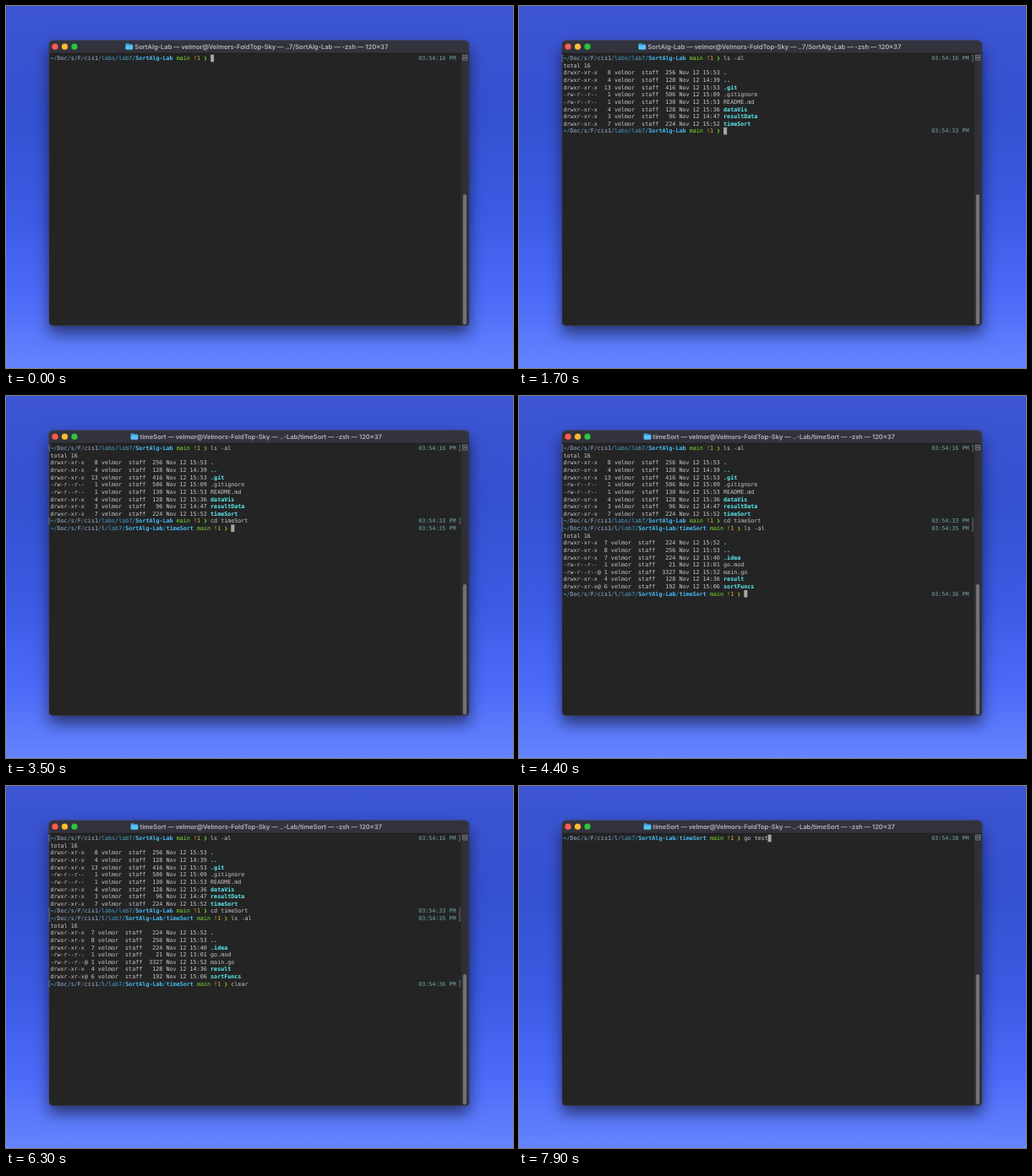
Animation of 600 by 429 pixels, one loop 8000 ms. Source, as an HTML page:

```html
<!DOCTYPE html>
<html lang="en">
<head>
<meta charset="utf-8">
<title>Terminal session</title>
<style>
  html, body { margin: 0; width: 100%; height: 100%; overflow: hidden; }
  body { background: linear-gradient(#3d55d2 0%, #3451d0 30%, #3c5be4 58%, #4b6af8 80%, #6584fe 100%); }
  svg { position: absolute; left: 0; top: 0; }
  .window {
    position: absolute; left: 50.5px; top: 40.5px; width: 497px; height: 338.5px;
    border-radius: 5.5px; background: #242424;
    box-shadow: 0 0 1px rgba(0,0,0,.8), 0 9px 18px rgba(0,0,0,.55);
  }
  text { white-space: pre; text-rendering: geometricPrecision; }
  .title { font: 600 7.5px Inter, sans-serif; fill: #b6b7be; }
  #screen text { font: 6.7px "DejaVu Sans Mono", monospace; fill: #c9c9c9; }
  #screen .dir { fill: #45a3cf; }
  #screen .short { fill: #a9b4d2; }
  #screen .anchor { fill: #46bdf8; font-weight: bold; }
  #screen .git { fill: #7fe02e; }
  #screen .dirty { fill: #e0b630; }
  #screen .clock { fill: #72a8ab; }
  #screen .folder { fill: #5ceef2; font-weight: bold; }
  .mark { fill: none; stroke: #8c8c8c; stroke-width: .7; }
</style>
</head>
<body>
<div class="window"></div>
<svg id="stage" width="600" height="429" viewBox="0 0 600 429">
  <path d="M50.5 56V46a5.5 5.5 0 0 1 5.5-5.5H542a5.5 5.5 0 0 1 5.5 5.5V56z" fill="#32333c"/>
  <path d="M50.5 56.2H547.5" stroke="#18181b" stroke-width=".6"/>
  <path d="M538.5 56.5H547.5V373.500a5.500 5.500 0 0 1-5.500 5.500H538.500z" fill="#2e2f37"/>
  <rect x="50.800" y="40.800" width="496.400" height="337.900" rx="5.300" fill="none" stroke="#5d5e68" stroke-opacity=".6" stroke-width=".6"/>
  <circle cx="58" cy="48.200" r="3.600" fill="#fd5b53"/>
  <circle cx="69.500" cy="48.200" r="3.600" fill="#fdbc2f"/>
  <circle cx="81" cy="48.200" r="3.600" fill="#2ac63f"/>
  <rect x="540.800" y="223" width="4.200" height="154.500" rx="2.100" fill="#71727a"/>
  <g fill="none" stroke="#94959b" stroke-width=".7">
    <rect x="540.700" y="58.200" width="4.800" height="5.800"/>
    <path d="M541.500 60.400h3.200M541.500 61.800h3.200"/>
  </g>
  <g id="titles"></g>
  <g id="screen"></g>
</svg>
<script>
const LOOP = 8000, CELL = 4.034, LINE = 8.62, LEFT = 52.5, TOP = 57.6;
const USER = "velmor", HOST = "Velmors-FoldTop-Sky";
const CLEARED = 6400, MOVED = 3300;
const screen = document.getElementById("screen");
const titles = document.getElementById("titles");

function add(parent, tag, attrs, content = "") {
  const el = document.createElementNS("http://www.w3.org/2000/svg", tag);
  for (const key in attrs) el.setAttribute(key, attrs[key]);
  el.textContent = content;
  parent.append(el);
  return el;
}
const colX = col => LEFT + col * CELL;
const rowY = row => TOP + row * LINE;
const show = (el, on) => el.setAttribute("visibility", on ? "visible" : "hidden");

function write(parent, row, col, content, cls = "") {
  add(parent, "text", { x: colX(col), y: rowY(row) + 6.6, class: cls }, content);
  return col + content.length;
}

// Window titles
function makeTitle(x, name, path) {
  const g = add(titles, "g", {});
  add(g, "path", { d: `M${x - 10.8} 45.200q0-1 1-1h2.400l1 1h3.200q1 0 1 1v4.400q0 1-1 1h-6.600q-1 0-1-1z`, fill: "#3c9fdc" });
  add(g, "path", { d: `M${x - 10.8} 46.700h8.600v3.900q0 1-1 1h-6.600q-1 0-1-1z`, fill: "#5cc1f5" });
  add(g, "text", { x, y: 50.8, class: "title" }, `${name} — ${USER}@${HOST} — ..${path} — -zsh — 120×37`);
  return g;
}
const titleA = makeTitle(152.3, "SortAlg-Lab", "7/SortAlg-Lab");
const titleB = makeTitle(158.5, "timeSort", "-Lab/timeSort");

// Prompts: path pieces as [text, class]
const head = [["~", "anchor"], ["/", "dir"], ["Doc", "short"], ["/", "dir"], ["s", "short"],
  ["/", "dir"], ["F", "short"], ["/", "dir"], ["cis1", "short"]];
const status = [[" main", "git"], [" !1", "dirty"], [" ❯", "git"]];
const outer = [...head, ["/labs/lab7/", "dir"], ["SortAlg-Lab", "anchor"], ...status];
const inner = [...head, ["/", "dir"], ["l", "short"], ["/lab7/", "dir"], ["SortAlg-Lab", "anchor"],
  ["/", "dir"], ["timeSort", "anchor"], ...status];

// Listings: mode, links, size, time, name
const listA = [
  ["drwxr-xr-x", 8, 256, "15:53", "."],
  ["drwxr-xr-x", 4, 128, "14:39", ".."],
  ["drwxr-xr-x", 13, 416, "15:53", ".git"],
  ["-rw-r--r--", 1, 506, "15:09", ".gitignore"],
  ["-rw-r--r--", 1, 130, "15:53", "README.md"],
  ["drwxr-xr-x", 4, 128, "15:36", "dataVis"],
  ["drwxr-xr-x", 3, 96, "14:47", "resultData"],
  ["drwxr-xr-x", 7, 224, "15:52", "timeSort"]
];
const listB = [
  ["drwxr-xr-x", 7, 224, "15:52", "."],
  ["drwxr-xr-x", 8, 256, "15:53", ".."],
  ["drwxr-xr-x", 7, 224, "15:40", ".idea"],
  ["-rw-r--r--", 1, 21, "13:01", "go.mod"],
  ["-rw-r--r--@", 1, 3327, "15:52", "main.go"],
  ["drwxr-xr-x", 4, 128, "14:36", "result"],
  ["drwxr-xr-x@", 6, 192, "15:06", "sortFuncs"]
];

// keys: times at which the text grows, by one letter or to a given length
const steps = [
  { row: 0, from: -200, path: outer, clock: "16", text: "ls -al",
    keys: [1000, 1100, 1200, 1300, 1400, 1500], enter: 1600, list: listA, linkEnd: 14, sizeEnd: 33 },
  { row: 10, from: 1600, path: outer, clock: "33", text: "cd timeSort",
    keys: [2200, 2400, 2500, 2700, 2800, [2900, 11]], enter: 3200 },
  { row: 11, from: 3300, path: inner, clock: "35", text: "ls -al",
    keys: [3700, 3800, 3900, 4000, 4100, 4200], enter: 4300, list: listB, linkEnd: 13, sizeEnd: 33 },
  { row: 20, from: 4300, path: inner, clock: "36", text: "clear",
    keys: [5300, 5400, 5500, 5700, 5800], enter: 6300 },
  { row: 0, from: CLEARED, path: inner, clock: "38", text: "go test",
    keys: [6900, 7000, 7200, 7300, 7500, 7600, 7800], enter: Infinity }
];

function drawList(g, step) {
  write(g, step.row + 1, 0, "total 16");
  step.list.forEach(([mode, links, size, time, name], i) => {
    const meta = mode.padEnd(11) + String(links).padStart(step.linkEnd - 11) + ` ${USER}  staff`;
    const line = meta + String(size).padStart(step.sizeEnd - meta.length) + ` Nov 12 ${time}`;
    write(g, step.row + 2 + i, 0, line);
    write(g, step.row + 2 + i, 47, name, mode[0] === "d" ? "folder" : "");
  });
}

for (const step of steps) {
  step.group = add(screen, "g", {});
  let col = 0;
  for (const [part, cls] of step.path) col = write(step.group, step.row, col, part, cls);
  step.col = col + 1;
  write(step.group, step.row, 108, `03:54:${step.clock} PM`, "clock");
  step.input = add(step.group, "text", { x: colX(step.col), y: rowY(step.row) + 6.6 });
  const y = rowY(step.row) + 0.8;
  step.marks = add(screen, "path", { class: "mark", d: `M52.400 ${y}h-1.300v7h1.300M535.800 ${y}h1.300v7h-1.300` });
  step.output = add(screen, "g", {});
  if (step.list) drawList(step.output, step);
}
const cursor = add(screen, "rect", { width: CELL, height: LINE, fill: "#a6a6a6" });

function render(t) {
  show(titleA, t < MOVED);
  show(titleB, t >= MOVED);
  let active;
  for (const step of steps) {
    const alive = t >= step.from && (step.from >= CLEARED || t < CLEARED);
    const entered = alive && t >= step.enter;
    show(step.group, alive);
    show(step.marks, entered);
    show(step.output, entered);
    let length = 0, last = step.from;
    for (const key of step.keys) {
      const [time, size] = [].concat(key);
      if (t >= time) { length = size || length + 1; last = time; }
    }
    step.input.textContent = step.text.slice(0, length);
    if (alive && !entered) active = { step, length, last };
  }
  const lit = active && (t - active.last) % 1000 < 500;
  show(cursor, lit);
  if (lit) {
    cursor.setAttribute("x", colX(active.step.col + active.length));
    cursor.setAttribute("y", rowY(active.step.row));
  }
}

const start = performance.now();
function tick(now) {
  render(Math.max(0, now - start) % LOOP);
  requestAnimationFrame(tick);
}
render(0);
requestAnimationFrame(tick);
</script>
</body>
</html>
```
